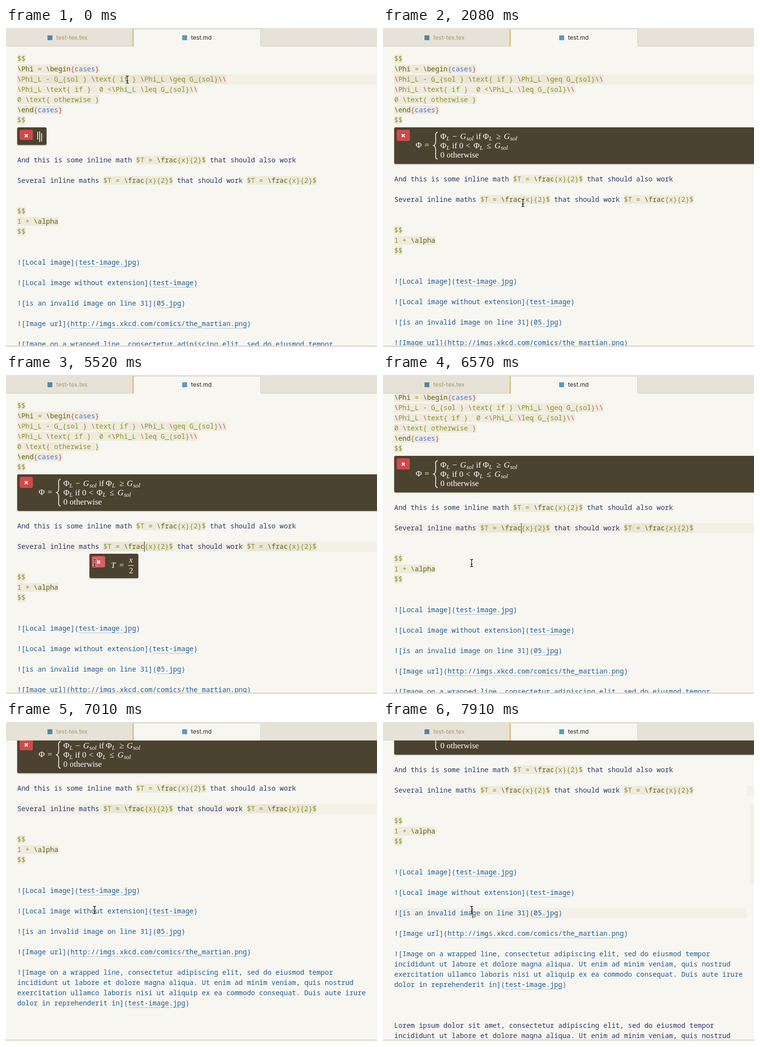
An HTML page that plays this animation: 760 by 655 pixels, repeating every 8 s.

```html
<!DOCTYPE html>
<html lang="en">
<head>
<meta charset="utf-8">
<title>Inline math preview</title>
<style>
  html, body { margin: 0; width: 100%; height: 100%; overflow: hidden; background: #f7f6f1; }
  svg { display: block; width: 760px; height: 655px; }
  text { white-space: pre; }
  .code { font: 14px "Noto Sans Mono", monospace; }
  .tab { font: 12px Inter, sans-serif; }
  .math { font: 17px "Liberation Serif", serif; fill: #fff; }
  .panel { filter: drop-shadow(0 1.5px 1px rgba(0, 0, 0, .35)); }
</style>
</head>
<body>
<svg id="stage" viewBox="0 0 760 655">
  <defs><clipPath id="view"><rect y="38" width="760" height="615"/></clipPath></defs>
  <rect width="760" height="655" fill="#f7f6f1"/>
  <g clip-path="url(#view)">
    <g id="doc">
      <rect id="active" x="23" height="21" fill="#f3f0e8"/>
      <rect id="rest" x="745" y="342" width="15" height="21" fill="#f3f0e8"/>
      <g id="upper"></g>
      <g id="lower"></g>
      <g id="panels"></g>
      <rect id="caret" width="1" height="21" fill="#2b2b2b"/>
    </g>
    <rect id="bar" x="752" y="170" width="8" height="162" fill="#f2efe7"/>
  </g>
  <g id="chrome">
    <rect width="760" height="38" fill="#e7e2d7"/>
    <rect y="37" width="760" height="1" fill="#d8d1c3"/>
    <rect x="260" y="2" width="262" height="36" fill="#f7f6f1"/>
    <path d="M260 2.5H521.5V37" fill="none" stroke="#d8d1c3"/>
    <rect x="259.5" y="2" width="2" height="36" fill="#d9b04e"/>
    <rect x="85" y="15" width="10" height="10" fill="#5089a5"/>
    <rect x="361" y="15" width="10" height="10" fill="#5b9ab9"/>
    <text class="tab" x="103" y="24" fill="#a29a70">test-tex.tex</text>
    <text class="tab" x="379" y="24" fill="#24221e">test.md</text>
    <rect y="652" width="760" height="3" fill="#e9e4da"/>
    <rect y="652" width="760" height="1" fill="#d5cdbd"/>
  </g>
  <g id="mouse" fill="none" stroke-linecap="round">
    <path class="beam" stroke="#fff" stroke-opacity=".7" stroke-width="3"/>
    <path class="beam" stroke="#111" stroke-width="1.3"/>
  </g>
</svg>
<script>
const $ = id => document.getElementById(id);
const LEFT = 23, CHAR = 8.4, LOOP = 8000;
const INK = {
  text: '#2b3968', math: '#8d902c', dark: '#5e6013', red: '#ca4a5a',
  blue: '#4b6fe2', link: '#1e5c96'
};

function add(parent, tag, attrs, content) {
  const el = document.createElementNS('http://www.w3.org/2000/svg', tag);
  for (const k in attrs) el.setAttribute(k, attrs[k]);
  if (content !== undefined) el.textContent = content;
  parent.appendChild(el);
  return el;
}
const show = (el, on) => el.setAttribute('visibility', on ? 'visible' : 'hidden');

// Split one line into [colour, text, decoration] runs.
const commands = s => s.split(/(\\[A-Za-z]+|\{(?=cases)|cases|(?<=cases)\})/).map((p, i) =>
  [i % 2 ? (p[0] === '\\' ? 'dark' : p === 'cases' ? 'blue' : 'red') : 'math', p, 'fill']);
const slashes = s => s.split(/(\\)/).map(p => [p === '\\' ? 'red' : 'math', p, 'fill']);
const prose = s => s.split(/(\$[^$]+\$)/).flatMap((p, i) => i % 2 ? commands(p) : [['text', p]]);
const links = s => s.split(/((?<=\]\()[^)]+)/).map((p, i) => ['link', p, i % 2 ? 'line' : '']);

function line(parent, y, runs) {
  let col = 0;
  for (const [ink, str, deco] of runs) {
    if (!str) continue;
    const x = LEFT + col * CHAR, w = str.length * CHAR;
    if (deco === 'fill')
      add(parent, 'rect', { x, y: y + 1, width: w, height: 18, fill: '#a0962e', 'fill-opacity': .11 });
    if (deco === 'line')
      add(parent, 'rect', { x, y: y + 19, width: w, height: 1, fill: '#a9c2d6' });
    add(parent, 'text', { class: 'code', x, y: y + 15, fill: INK[ink] }, str);
    col += str.length;
  }
}

const up = $('upper'), low = $('lower');
line(up, 53, commands('$$'));
line(up, 74, commands('\\Phi = \\begin{cases}'));
line(up, 95, slashes('\\Phi_L - G_{sol } \\text{ if } \\Phi_L \\geq G_{sol}\\\\'));
line(up, 116, slashes('\\Phi_L \\text{ if }  0 <\\Phi_L \\leq G_{sol}\\\\'));
line(up, 137, slashes('0 \\text{ otherwise }'));
line(up, 158, commands('\\end{cases}'));
line(up, 179, commands('$$'));

const frac = '$T = \\frac{x}{2}$';
line(low, 300, prose(`And this is some inline math ${frac} that should also work`));
line(low, 342, prose(`Several inline maths ${frac} that should work ${frac}`));
['$$', '1 + \\alpha', '$$'].forEach((s, i) => line(low, 405 + 21 * i, commands(s)));
[
  '![Local image](test-image.jpg)',
  '![Local image without extension](test-image)',
  '![is an invalid image on line 31](05.jpg)',
  '![Image url](http://imgs.xkcd.com/comics/the_martian.png)'
].forEach((s, i) => line(low, 510 + 42 * i, links(s)));
[
  '![Image on a wrapped line, consectetur adipiscing elit, sed do eiusmod tempor',
  'incididunt ut labore et dolore magna aliqua. Ut enim ad minim veniam, quis nostrud',
  'exercitation ullamco laboris nisi ut aliquip ex ea commodo consequat. Duis aute irure',
  'dolor in reprehenderit in](test-image.jpg)'
].forEach((s, i) => line(low, 678 + 21 * i, links(s)));
[
  'Lorem ipsum dolor sit amet, consectetur adipiscing elit, sed do eiusmod tempor',
  'incididunt ut labore et dolore magna aliqua. Ut enim ad minim veniam, quis nostrud'
].forEach((s, i) => line(low, 825 + 21 * i, prose(s)));

// Preview panels
function panel(x, y, w, h, buttonH = 23) {
  const g = add($('panels'), 'g', {});
  add(g, 'rect', { class: 'panel', x, y, width: w, height: h, rx: 3, fill: '#4b422f' });
  g.button = add(g, 'rect', { x: x + 5, y: y + 5, width: 27, height: buttonH, rx: 3, fill: '#d1494b' });
  add(g, 'path', {
    d: `M${x + 15.5} ${y + 14}l6 6m0 -6l-6 6`, stroke: '#fff', 'stroke-width': 2.4
  });
  return g;
}
function spinner(x, y) {
  const g = panel(x, y, 60, 36, 21);
  g.bars = [[41, 9, 16], [45, 8, 22], [49, 12, 17]].map(([dx, dy, h]) =>
    add(g, 'rect', { x: x + dx, y: y + dy, width: 1.7, height: h, fill: '#eeebe3' }));
  return g;
}
function formula(g, y, parts) {
  for (const [x, s, style] of parts) {
    const sub = style === 'sub';
    add(g, 'text', {
      class: 'math', x, y: y + (sub ? 3 : 0),
      style: (style ? 'font-style:italic;' : '') + (sub ? 'font-size:12.5px' : '')
    }, s);
  }
}
const phi = x => [[x, 'Φ'], [x + 12.5, 'L', 'sub']];
const sol = x => [[x, 'G', 'it'], [x + 13, 'sol', 'sub']];

const blockWait = spinner(23, 204);
const block = panel(23, 204, 740, 75);
formula(block, 246, [[67, 'Φ'], [85, '=']]);
formula(block, 228, [...phi(117.5), [142, '−'], ...sol(158), [190.5, 'if'], ...phi(204.5), [232, '≥'], ...sol(247.5)]);
formula(block, 247, [...phi(117.5), [141.5, 'if'], [156, '0'], [169.5, '<'], ...phi(185.5), [212, '≤'], ...sol(228.5)]);
formula(block, 266, [[117.5, '0 otherwise']]);
add(block, 'path', {
  d: 'M112 214C106 214 108 222 108 229C108 237 107.5 240 103.5 241.5C107.5 243 108 246 108 254C108 261 106 269 112 269',
  fill: 'none', stroke: '#fff', 'stroke-width': 1.5
});

const popWait = spinner(171, 367);
const pop = panel(171, 367, 100, 50);
formula(pop, 396, [[215, 'T', 'it'], [232, '=']]);
formula(pop, 385, [[252, 'x', 'it']]);
formula(pop, 407, [[252, '2']]);
add(pop, 'rect', { x: 250, y: 390.5, width: 12, height: 1, fill: '#fff' });

document.querySelectorAll('.beam').forEach(el => el.setAttribute('d',
  'M-2.5 -7.5Q0 -7.5 0 -5.5Q0 -7.5 2.5 -7.5M0 -5.5V5.5M-2.5 7.5Q0 7.5 0 5.5Q0 7.5 2.5 7.5M-1.5 2.5H1.5'));

// Held values: [time, ...value]
const path = [
  [0, 248.5, 106], [890, 241, 130], [1040, 222, 185], [1190, 211, 245], [1330, 232, 298],
  [1480, 276, 335], [1630, 317, 351], [1780, 300, 358], [1930, 286.5, 359],
  [4030, 280, 361], [4180, 256, 368], [4330, 222, 379], [4480, 190, 391],
  [4630, 174, 397], [4780, 176, 390], [4920, 181.5, 386]
];
const scrolls = [
  [0, 0], [6420, 8], [6570, 38], [6710, 86], [6860, 135], [7010, 174],
  [7160, 196], [7310, 208], [7460, 212]
];
const held = (keys, t) => keys.findLast(k => k[0] <= t);
const blinks = [140, 440, 890, 1330, 1630, 2080, 2380, 2830, 3130, 3580, 4030, 4480, 4780,
  5220, 5520, 5970, 6420, 6860, 7160, 7610, 7910];

function render(t) {
  const [, mx, my] = held(path, t);
  const scroll = held(scrolls, t)[1];
  const loading = t < 290, moved = t >= 2380, last = t >= 7910;
  $('doc').setAttribute('transform', `translate(0 ${-scroll})`);
  low.setAttribute('transform', `translate(0 ${loading ? -39 : 0})`);
  $('mouse').setAttribute('transform', `translate(${mx} ${my})`);

  const row = last ? 594 : moved ? 342 : 95;
  $('active').setAttribute('y', row);
  $('active').setAttribute('width', last ? 722 : 737);
  show($('rest'), last);
  show($('bar'), t >= 7460);
  $('caret').setAttribute('x', last ? 183 : moved ? 283 : 250);
  $('caret').setAttribute('y', row);
  show($('caret'), blinks.filter(b => b <= t).length % 2);

  show(blockWait, loading);
  show(block, !loading);
  show(popWait, t >= 3130 && t < 3280);
  show(pop, t >= 3280 && t < 5670);
  blockWait.bars[2].setAttribute('height', t < 140 ? 17 : 12);
  const hover = mx > 176 && mx < 203 && my > 372 && my < 395;
  pop.button.setAttribute('fill', hover ? '#dc5e60' : '#d1494b');
}

const start = performance.now();
function tick() {
  render((performance.now() - start) % LOOP);
  requestAnimationFrame(tick);
}
render(0);
requestAnimationFrame(tick);
</script>
</body>
</html>
```
